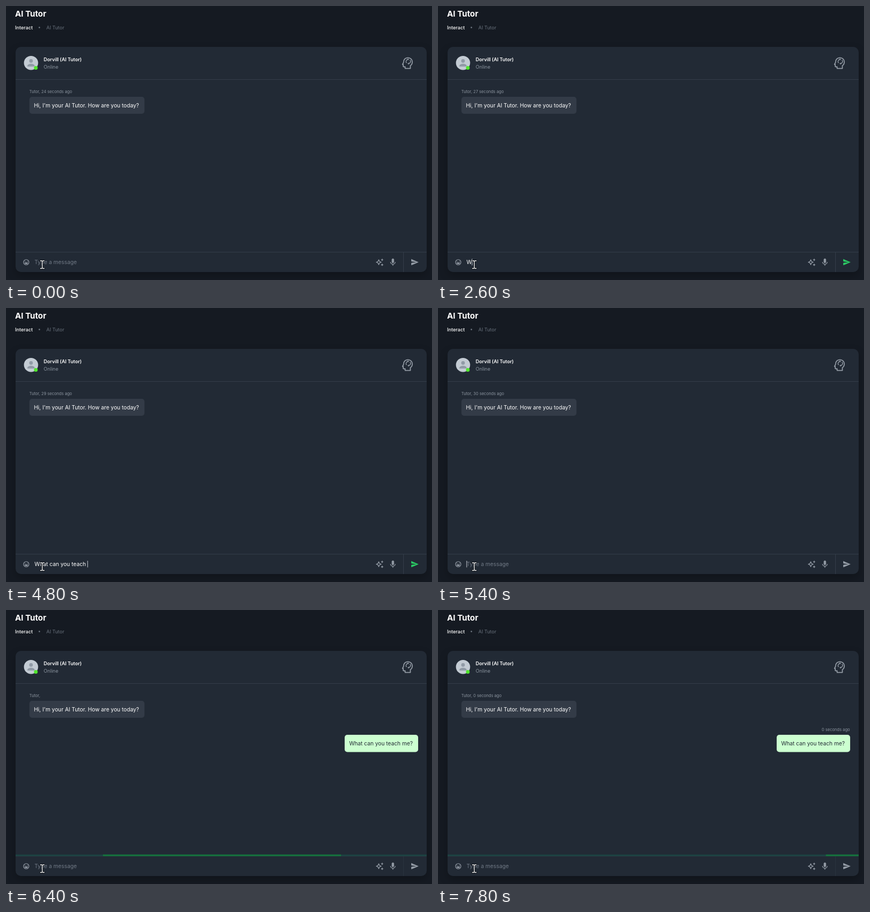
Animation of 800x516 px, one loop 8000 ms. Source, as an HTML page:

```html
<!DOCTYPE html>
<html lang="en">
<head>
<meta charset="utf-8">
<title>AI Tutor chat</title>
<style>
html, body { margin: 0; width: 100%; height: 100%; overflow: hidden; background: #151a22; }
svg { display: block; width: 100%; height: 100%; }
text { font-family: Inter, "Open Sans", sans-serif; white-space: pre; fill: #fff; }
.title { font-size: 15.2px; font-weight: 700; }
.name { font-size: 9px; font-weight: 600; }
.small { font-size: 9.1px; }
.meta { font-size: 7.6px; fill: #8b949f; }
.body { font-size: 10.25px; }
.muted { fill: #8b949f; }
.line { stroke: #343d49; }
.icon { fill: #949ca6; }
.outline { fill: none; stroke: #949ca6; }
.card { filter: drop-shadow(0 7px 8px rgba(0, 0, 0, .22)); }
</style>
</head>
<body>
<svg viewBox="0 0 800 516">
  <text class="title" x="17" y="19.5">AI Tutor</text>
  <text class="small" x="17" y="44" font-weight="500">Interact</text>
  <circle cx="62.7" cy="40.5" r="1.4" fill="#68717c"/>
  <text class="small" x="75.7" y="44" style="fill:#68717c">AI Tutor</text>

  <rect class="card" x="18" y="77" width="772" height="424" rx="10" fill="#222a35"/>

  <!-- Header -->
  <circle cx="47" cy="107.2" r="13.3" fill="#c3cbd3"/>
  <g fill="#919ba6">
    <circle cx="47" cy="103.4" r="3.4"/>
    <path d="M40.2 114v-1.6c0-2.3 4.2-3.7 6.8-3.7s6.8 1.4 6.8 3.7V114z"/>
  </g>
  <circle cx="56" cy="116.4" r="3.5" fill="#50e62d"/>
  <text class="name" x="70.8" y="103.6">Dorvill (AI Tutor)</text>
  <text class="small muted" x="70.8" y="118.2">Online</text>
  <g class="outline" stroke-width="1.8" stroke-linejoin="round">
    <path d="M749.5 117.6v-3.1h-2a1.6 1.6 0 0 1-1.6-1.6V110h-1.3l1.9-3.6c0-5.8 3.6-9.1 8.3-9.1 4.6 0 8.2 3.6 8.2 8.2 0 3-1.4 5.3-3.6 6.9v5.2z"/>
    <path stroke-width="1.4" d="M752.4 107.3a4 4 0 0 1 2.4-6.8M758.6 101.7a4 4 0 0 1-2.4 6.8"/>
  </g>
  <path class="icon" d="M754.3 98.6l2.7 2-2.7 2zM756.7 106.4l-2.7 2 2.7 2z"/>
  <path class="line" d="M18 138.5H790"/>

  <!-- Conversation -->
  <text class="meta" id="tutorTime" x="43.8" y="163.6"></text>
  <rect x="44" y="171" width="216" height="32" rx="5" fill="#333b47"/>
  <text class="body" x="52.5" y="191">Hi, I'm your AI Tutor. How are you today?</text>
  <g id="reply">
    <text class="meta" id="replyTime" x="773.6" y="228" text-anchor="end">0 seconds ago</text>
    <rect x="636" y="235" width="138" height="32.5" rx="5" fill="#ccffd0"/>
    <text class="body" x="644.4" y="255.2" style="fill:#222a35">What can you teach me?</text>
  </g>

  <!-- Composer -->
  <path class="line" d="M18 463.5H790"/>
  <path class="line" id="divider" d="M746.5 464V501"/>
  <g id="progress">
    <rect x="18" y="460.5" width="772" height="3" fill="#1b4342"/>
    <rect class="bar" y="460.5" height="3" fill="#15743c"/>
    <rect class="bar" y="460.5" height="3" fill="#15743c"/>
  </g>
  <circle class="outline" cx="38" cy="482.5" r="5" stroke-width="1.2"/>
  <path class="icon" d="M35 483h6a3 3 0 0 1-6 0z"/>
  <circle class="icon" cx="36.2" cy="480.9" r=".75"/>
  <circle class="icon" cx="39.8" cy="480.9" r=".75"/>
  <text class="body" id="input" x="53.6" y="486.2"></text>
  <rect id="caret" y="476" width="1" height="12.5" fill="#c9ced4"/>
  <path class="outline" stroke-width="1.3" stroke-linejoin="round" d="M700 477.8l1.4 3.3 3.3 1.4-3.3 1.4-1.4 3.3-1.4-3.3-3.3-1.4 3.3-1.4z"/>
  <path class="icon" d="M706.4 475.3l.8 1.9 1.9.8-1.9.8-.8 1.9-.8-1.9-1.9-.8 1.9-.8zM706.4 484.7l.8 1.9 1.9.8-1.9.8-.8 1.9-.8-1.9-1.9-.8 1.9-.8z"/>
  <path class="icon" transform="translate(717.9 474) scale(.72)" d="M12 14c1.66 0 3-1.34 3-3V5c0-1.66-1.34-3-3-3S9 3.34 9 5v6c0 1.66 1.34 3 3 3zm5.3-3c0 3-2.54 5.1-5.3 5.1S6.7 14 6.7 11H5c0 3.41 2.72 6.23 6 6.72V21h2v-3.28c3.28-.48 6-3.3 6-6.72z"/>
  <path id="send" transform="translate(759.7 474.5) scale(.66)" d="M2 21L23 12 2 3v7l15 2-15 2z"/>

  <!-- Text pointer -->
  <g fill="none" stroke-linecap="square">
    <path id="beam" stroke="#10151c" stroke-width="3.4" d="M64.8 479.7h2.1l1.3 1 1.3-1h2.1M68.2 481v12M64.8 494.3h2.1l1.3-1 1.3 1h2.1"/>
    <use href="#beam" id="beamCore"/>
    <path stroke="#f2f2f2" stroke-width="1.4" d="M64.8 479.7h2.1l1.3 1 1.3-1h2.1M68.2 481v12M64.8 494.3h2.1l1.3-1 1.3 1h2.1"/>
  </g>
</svg>
<script>
const LOOP = 8, STEP = 0.2;
const TYPE_START = 2.6, KEY_TIME = 1.4 / 12, SENT = 5.3;
const LOADING = 5.902, REPLY_TICK = 6.9;
const QUESTION = "What can you teach me?";
const CARD_LEFT = 18, CARD_WIDTH = 772;

const $ = id => document.getElementById(id);
const show = (node, visible) => node.setAttribute("visibility", visible ? "visible" : "hidden");
const clamp = v => Math.min(1, Math.max(0, v));
const mix = (a, b, k) => a + (b - a) * k;
const bars = document.querySelectorAll(".bar");

$("beamCore").remove();

function cubicBezier(x1, y1, x2, y2) {
  const curve = (a, b, s) => 3 * (1 - s) ** 2 * s * a + 3 * (1 - s) * s * s * b + s ** 3;
  return x => {
    let low = 0, high = 1;
    for (let i = 0; i < 30; i++) {
      const mid = (low + high) / 2;
      if (curve(x1, x2, mid) < x) low = mid; else high = mid;
    }
    return curve(y1, y2, low);
  };
}

// Left and right edges run as fractions of the card width.
const sweeps = [
  { delay: 0, ease: cubicBezier(.65, .815, .735, .395), left: [-.35, 1], right: [0, 1.9] },
  { delay: 1.15, ease: cubicBezier(.165, .84, .44, 1), left: [-2, 1.07], right: [0, 1.08] }
];

function drawProgress(elapsed) {
  sweeps.forEach(({ delay, ease, left, right }, i) => {
    const k = ease(clamp((elapsed - delay) / 1.26));
    const start = clamp(mix(...left, k)), end = clamp(mix(...right, k));
    bars[i].setAttribute("x", CARD_LEFT + start * CARD_WIDTH);
    bars[i].setAttribute("width", (end - start) * CARD_WIDTH);
  });
}

function drawComposer(t) {
  const typing = t >= TYPE_START - .001 && t < SENT;
  const count = Math.floor((t - TYPE_START) / KEY_TIME + 1.001);
  const input = $("input");
  input.textContent = typing ? QUESTION.slice(0, count) : "Type a message";
  input.style.fill = typing ? "#fff" : "#717a86";
  $("send").style.fill = typing ? "#2bc964" : "#949ca6";

  const blinkOn = Math.floor(t / .53) % 2 === 1;
  show($("caret"), typing || (t < TYPE_START ? blinkOn : t < 5.7));
  $("caret").setAttribute("x", 53.4 + (typing ? input.getComputedTextLength() : 0));
}

function draw(t) {
  const loading = t >= LOADING, ticked = t >= REPLY_TICK;
  const age = loading ? 0 : Math.floor(24.75 + t);
  $("tutorTime").textContent = "Tutor," + (loading && !ticked ? "" : ` ${age} seconds ago`);
  show($("reply"), loading);
  show($("replyTime"), ticked);
  show($("progress"), loading);
  $("divider").style.stroke = loading ? "#2a333e" : "";
  drawComposer(t);
  if (loading) drawProgress(t - LOADING);
}

function frame() {
  const t = performance.now() / 1000 % LOOP;
  draw(Math.floor(t / STEP) * STEP);
  requestAnimationFrame(frame);
}
frame();
</script>
</body>
</html>
```
